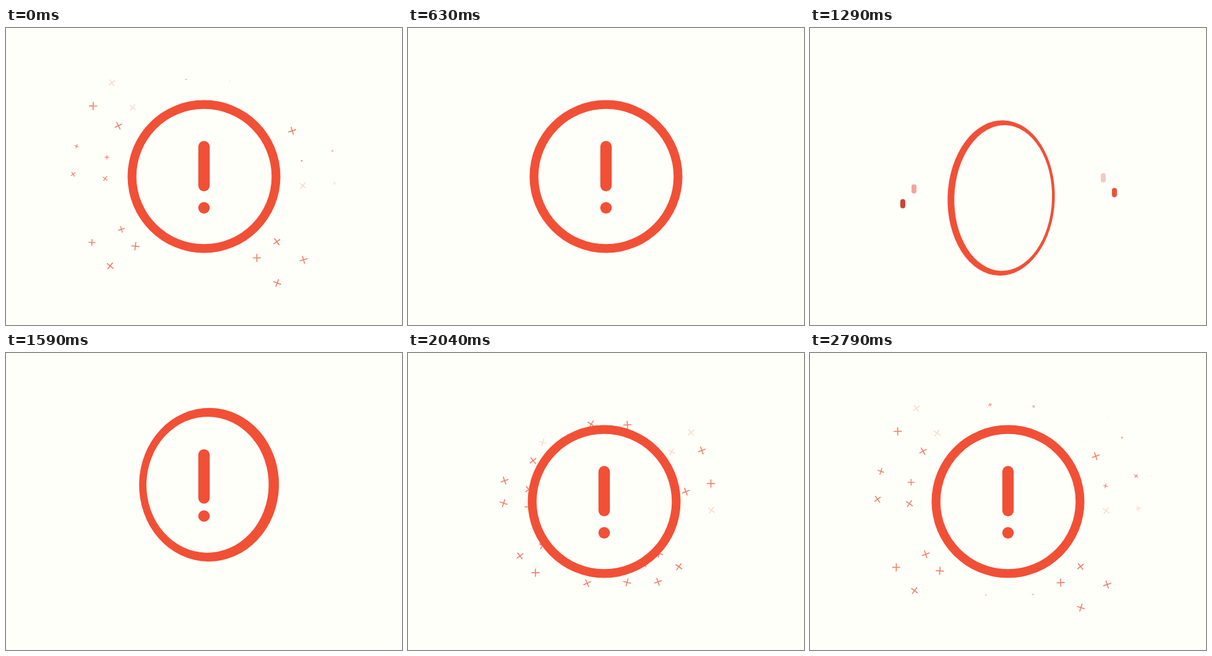
An HTML page with a canvas for the animation above (2830 ms loop, 640 px wide and 480 px high).

```html
<!DOCTYPE html>
<html lang="en">
<head>
<meta charset="utf-8">
<title>Alert icon</title>
<style>
html, body { margin: 0; width: 100%; height: 100%; overflow: hidden; background: #fffffa; }
canvas { display: block; }
</style>
</head>
<body>
<canvas id="stage" width="640" height="480"></canvas>
<script>
const ctx = document.getElementById('stage').getContext('2d');
const LOOP = 2830, TAU = 2 * Math.PI, RAD = Math.PI / 180;
const BG = '#fffffa', MAIN = '#f15036';
const CX = 320, R = 123.5, BURST_Y = 266;

// Directions of the burst in degrees, in order of birth
const SPOKES = [-45, 106, 72, -35, -77, -99, -18, -4, -160, -172, 156, 142, 34, 51, -130, -142];
const DASH_TINTS = ['#cf4433', '#f5a59a', MAIN, '#f4c9c1'];

const Y = [[640, 240], [780, 262], [1010, 128], [1300, 275], [1640, 209.6], [1780, 244], [1900, 240]];
const WIDTH = [[760, 14.2], [1000, 7.7], [1300, 7.7], [1560, 14.2]];
const GROW = [[700, 1], [840, 0], [1400, 0], [1590, 1.08], [1720, 1]];
const DASH = [[1080, 0], [1150, 90], [1290, 15], [1330, 0]];

const clamp = v => Math.max(0, Math.min(1, v));
const flight = age => 1 - Math.exp(-age / 335);

// Smooth interpolation along [time, value] points
function track(keys, t) {
  if (t <= keys[0][0]) return keys[0][1];
  for (let i = 1; i < keys.length; i++) {
    const [a, v] = keys[i - 1], [b, w] = keys[i];
    if (t < b) return v + (w - v) * (1 - Math.cos(Math.PI * (t - a) / (b - a))) / 2;
  }
  return keys[keys.length - 1][1];
}

function ellipse(x, y, rx, ry) {
  ctx.moveTo(x + rx, y);
  ctx.ellipse(x, y, rx, ry, 0, 0, TAU);
}

function pill(x, top, height, w, color) {
  ctx.fillStyle = color;
  ctx.beginPath();
  ctx.roundRect(x - w / 2, top, w, height, Math.min(w, height) / 2);
  ctx.fill();
}

function cross(x, y, size, angle, color) {
  ctx.save();
  ctx.translate(x, y);
  ctx.rotate(angle);
  ctx.strokeStyle = color;
  ctx.lineWidth = 0.6 + size * 0.16;
  ctx.beginPath();
  ctx.moveTo(-size, 0);
  ctx.lineTo(size, 0);
  ctx.moveTo(0, -size);
  ctx.lineTo(0, size);
  ctx.stroke();
  ctx.restore();
}

function burst(t) {
  SPOKES.forEach((deg, i) => {
    const dx = Math.cos(deg * RAD), dy = Math.sin(deg * RAD);
    const rows = Math.abs(dx) < 0.35 ? 1 : 2;
    for (let row = 0; row < rows; row++) {
      const late = row === 0 && i % 4 === 3;
      const born = late ? 1790 + 5 * i : 1438 + 265 * Math.pow(i / 15, 1.6);
      const age = (t - born + LOOP) % LOOP;
      const size = 6.6 * clamp((1368 - age) / 135);
      if (size < 0.2) continue;
      const reach = 157 - 28 * dy + 52 * row;
      const dist = reach * flight(age) / flight(2790 - born);
      const angle = (i * 37 + row * 20 + age * 0.05) * RAD;
      cross(CX + dx * dist, BURST_Y + dy * dist, size, angle, i % 7 ? '#f08068' : '#f8dcd0');
    }
  });
}

// Speed lines beside the falling ring
function dashes(t) {
  const len = track(DASH, t);
  if (len < 0.5) return;
  DASH_TINTS.forEach((color, i) => {
    const side = i < 2 ? -1 : 1, inner = i % 2;
    const x = 321 + side * (171 - 18 * inner);
    const y = 274 - 9 * side - 24 * inner + (t - 1290) * 0.9;
    pill(x, y - len / 2, len, Math.min(8, len), color);
  });
}

function ring(x, y, t) {
  const turn = -540 * RAD * Math.pow(clamp((1780 - t) / 1048), 1.823);
  const lean = Math.sin(2 * turn), side = Math.abs(Math.sin(turn));
  const rx = Math.max(4, R * Math.abs(Math.cos(turn)));
  const ry = R + 4 * side * side;
  const w = track(WIDTH, t);
  ctx.save();
  ctx.translate(x - 11 * lean, y);
  ctx.rotate(0.045 * side);
  ctx.beginPath();
  ellipse(0, 0, rx, ry);
  ctx.fillStyle = BG;
  ctx.fill();
  if (rx > w) ellipse(3.2 * lean, 0, rx - w, ry - w);
  ctx.fillStyle = MAIN;
  ctx.fill('evenodd');
  ctx.restore();
}

function mark(x, y, t) {
  const g = track(GROW, t);
  if (g < 0.02) return;
  const dot = 18.6 * Math.min(1, g);
  pill(x, y - 57.5, 81.5 * g, 18.4 * Math.min(1, g * 3), MAIN);
  pill(x, y + 50.6 - dot / 2, dot, dot, MAIN);
}

function draw(t) {
  ctx.fillStyle = BG;
  ctx.fillRect(0, 0, 640, 480);
  burst(t);
  dashes(t);

  const s = t - 1760;
  const shake = s > 0 && s < 640 ? 12 * Math.exp(-s / 200) * Math.sin(TAU * s / 160) : 0;
  const y = track(Y, t);
  ring(CX + shake, y, t);
  mark(CX + shake, y, t);
}

const start = performance.now();
function tick() {
  draw((performance.now() - start) % LOOP);
  requestAnimationFrame(tick);
}
tick();
</script>
</body>
</html>
```
